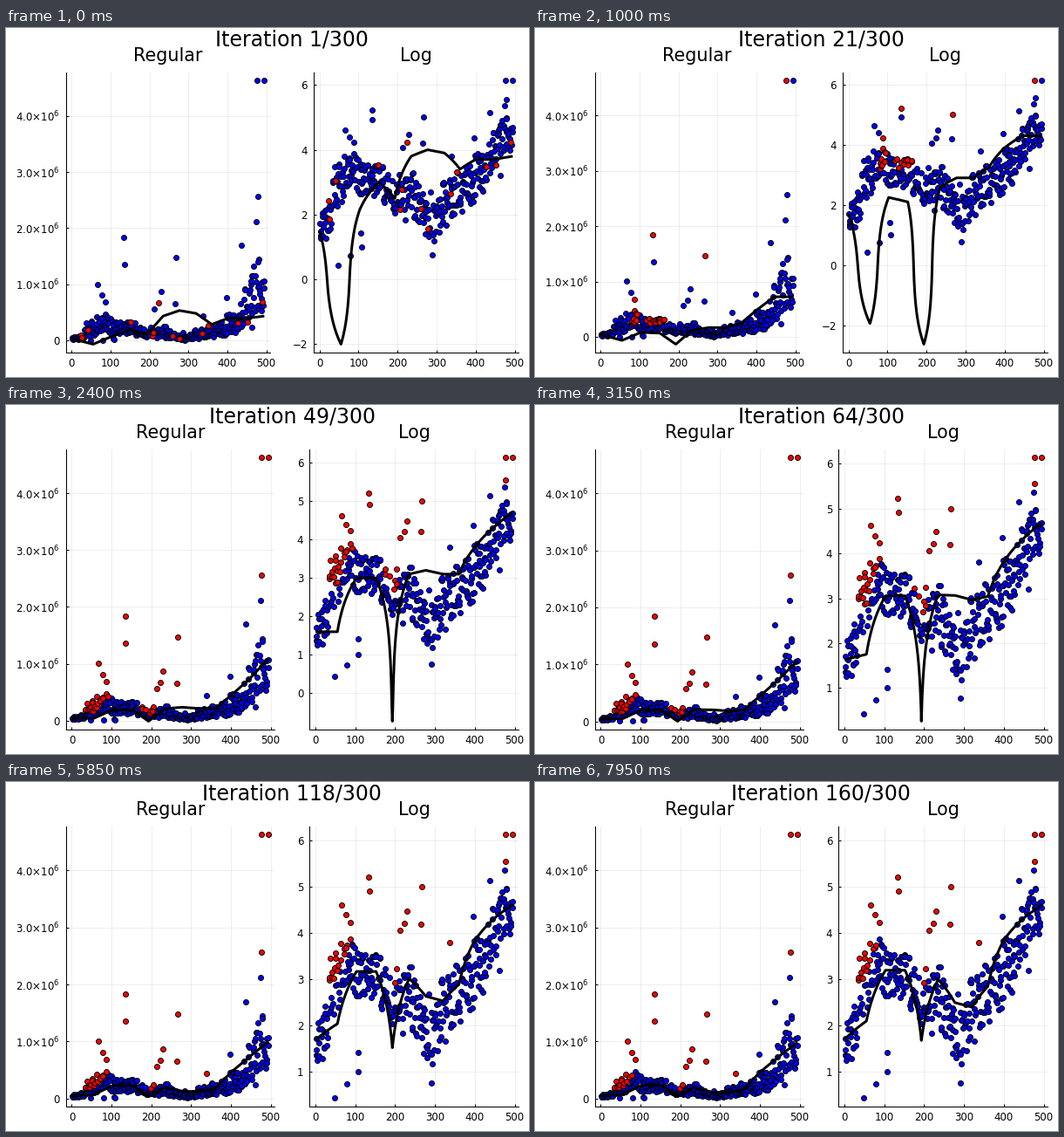
These frames come from a looping animation (600x400 px, 8 s). A matplotlib script:

```python
import numpy as np
import matplotlib.pyplot as plt
from matplotlib.animation import FuncAnimation

W, H, PX = 600, 400, 0.72          # stage size, points per pixel at 100 dpi
FRAMES, STEP = 160, 50
TOP, BASE = 51, 371.5              # panel edges, pixels from the top
X_MAX = 495

plt.rcParams.update({"font.family": "DejaVu Sans", "font.size": 11.8 * PX,
                     "mathtext.fontset": "dejavusans",
                     "axes.linewidth": PX})


def unlog(v):
    """Signed-log value to plain value, in units of 1e4."""
    return np.sign(v) * np.expm1(np.abs(v))


def signed_log(u):
    return np.sign(u) * np.log1p(np.abs(u))


# fitted curve: a broken line whose knots move between four shapes
KNOTS = [0, 55, 103, 152, 193, 235, 277, 320, 360, 400, 446, X_MAX]
STAGES = [1, 21, 49, 160]
SHAPES = unlog(np.array([
    [1.5, -2.0, 2.15, 3.0, 2.5, 3.8, 4.0, 3.9, 3.4, 3.7, 3.7, 3.8],
    [1.7, -1.94, 2.25, 2.1, -2.63, 2.6, 2.9, 2.9, 3.25, 3.9, 4.3, 4.3],
    [1.6, 1.6, 3.0, 3.0, -0.73, 3.1, 3.2, 3.1, 3.1, 3.8, 4.3, 4.7],
    [1.7, 2.1, 3.2, 3.2, 1.68, 3.0, 2.5, 2.4, 2.85, 3.85, 4.3, 4.6]]))
line_x = np.union1d(np.arange(X_MAX + 1), KNOTS)


def curve(it):
    k = min(np.searchsorted(STAGES, it, side="right") - 1, len(STAGES) - 2)
    t = (it - STAGES[k]) / (STAGES[k + 1] - STAGES[k])
    if k == len(STAGES) - 2:
        t = 1 - (1 - t) ** 2       # the fit settles slowly at the end
    return np.interp(line_x, KNOTS, SHAPES[k] + t * (SHAPES[k + 1] - SHAPES[k]))


# main cloud: x with the lower and upper rim of the band
BAND = np.array([
    (0, 0.8, 2.0), (20, 1.1, 2.7), (40, 2.0, 3.7), (65, 2.5, 3.9),
    (85, 2.8, 4.0), (110, 2.5, 3.6), (150, 2.6, 3.7), (190, 1.9, 3.2),
    (235, 1.7, 3.5), (265, 1.5, 3.2), (290, 0.6, 2.7), (320, 1.4, 3.1),
    (380, 2.2, 3.8), (420, 2.7, 4.0), (445, 3.2, 4.7), (470, 3.9, 5.2),
    (X_MAX, 3.9, 5.1)])
# the few points clearly off the band
LOOSE = np.array([
    (66, 4.62), (77, 4.4), (87, 4.24), (134, 5.22), (135, 4.92), (213, 4.06),
    (223, 4.22), (229, 4.48), (265, 4.2), (267, 5.0), (338, 3.8), (397, 4.36),
    (437, 5.14), (475, 5.36), (478, 5.55), (476, 6.14), (X_MAX, 6.14),
    (48, 0.43), (79, 0.74), (106, 1.42), (108, 1.0), (462, 3.2)])

rng = np.random.default_rng(5)
N = 360
cloud_x = np.clip(np.linspace(0, X_MAX, N) + rng.uniform(-2, 2, N), 0, X_MAX)
low, high = (np.interp(cloud_x, BAND[:, 0], rim) for rim in BAND.T[1:])
x = np.r_[LOOSE[:, 0], cloud_x]
v = np.r_[LOOSE[:, 1], low + (high - low) * rng.beta(1.5, 1.5, N)]
u = unlog(v)

# red points: a random handful, then high groups, then all far above the fit
first = (rng.random(x.size) < 0.04) & (v < 5)
groups = (((abs(x - 88) < 8) & (v > 3.1)) | ((abs(x - 143) < 24) & (v > 3.2))
          | ((x < 400) & (v > 4.95)) | (v > 6)) & (x < 490) & (x != 135)
to_groups = rng.uniform(2, 19, x.size)
to_fit = rng.uniform(23, 46, x.size)


def red_mask(it, line_u):
    fit = np.interp(x, line_x, signed_log(line_u))
    above = v > np.maximum(fit, 1.7) + 0.95
    return np.where(it < to_groups, first, np.where(it < to_fit, groups, above))


def padded(lo, hi):
    pad = 0.03 * (hi - lo)
    return lo - pad, hi + pad


fig = plt.figure(figsize=(W / 100, H / 100), dpi=100, facecolor="white")


def heading(x_px, y_px, size, text=""):
    return fig.text(x_px / W, 1 - y_px / H, text, fontsize=size * PX,
                    ha="center", va="baseline")


class Panel:
    def __init__(self, name, ys):
        self.ys = ys
        self.ax = ax = fig.add_axes([0.1, 0.1, 0.4, 0.8])
        ax.spines[["top", "right"]].set_visible(False)
        ax.set_axisbelow(True)
        ax.grid(color="black", alpha=0.065, lw=PX)
        ax.tick_params(direction="in", length=3 * PX, width=PX)
        ax.tick_params(axis="x", pad=6.5 * PX)
        ax.tick_params(axis="y", pad=7 * PX)
        ax.set_xlim(*padded(0, X_MAX))
        ax.set_xticks(range(0, 501, 100))
        dot = dict(ls="", marker="o", ms=6 * PX, mec="black", mew=0.95 * PX)
        self.blue, = ax.plot([], [], color="#0000ff", zorder=2.1, **dot)
        self.red, = ax.plot([], [], color="#ff0000", zorder=2.2, **dot)
        self.line, = ax.plot([], [], color="black", lw=3 * PX, zorder=3,
                             solid_joinstyle="round", solid_capstyle="butt")
        self.title = heading(0, 38, 20.6, name)

    def place(self, left, right):
        self.ax.set_position([left / W, 1 - BASE / H,
                              (right - left) / W, (BASE - TOP) / H])
        self.title.set_x((left + right) / 2 / W)

    def show(self, red, line_y):
        self.blue.set_data(x[~red], self.ys[~red])
        self.red.set_data(x[red], self.ys[red])
        self.line.set_data(line_x, line_y)
        lims = padded(min(self.ys.min(), line_y.min()),
                      max(self.ys.max(), line_y.max()))
        self.ax.set_ylim(*lims)
        return lims


plain = Panel("Regular", u * 1e4)
logged = Panel("Log", v)
plain.ax.set_yticks(np.arange(5) * 1e6,
                    ["0"] + [f"{k}.0×10$^{{6}}$" for k in range(1, 5)])
head = heading(328.3, 20.7, 23.6)


def draw(frame):
    it = frame + 1
    line_u = curve(it)
    red = red_mask(it, line_u)
    plain.show(red, line_u * 1e4)
    lo, hi = logged.show(red, signed_log(line_u))

    step = 2 if hi - lo > 7.5 else 1
    ticks = np.arange(int(np.ceil(lo / step)) * step, hi, step)
    logged.ax.set_yticks(ticks, [f"{t:.0f}".replace("-", "−") for t in ticks])

    # a minus sign in the labels makes both panels narrower
    wide = ticks[0] < 0
    plain.place(68.7, 303 if wide else 308)
    logged.place(353 if wide else 348.3, 588)
    head.set_text(f"Iteration {it}/300")
    return []


anim = FuncAnimation(fig, draw, frames=FRAMES, interval=STEP,
                     init_func=lambda: draw(0), repeat=True, repeat_delay=0)
plt.show()
```
